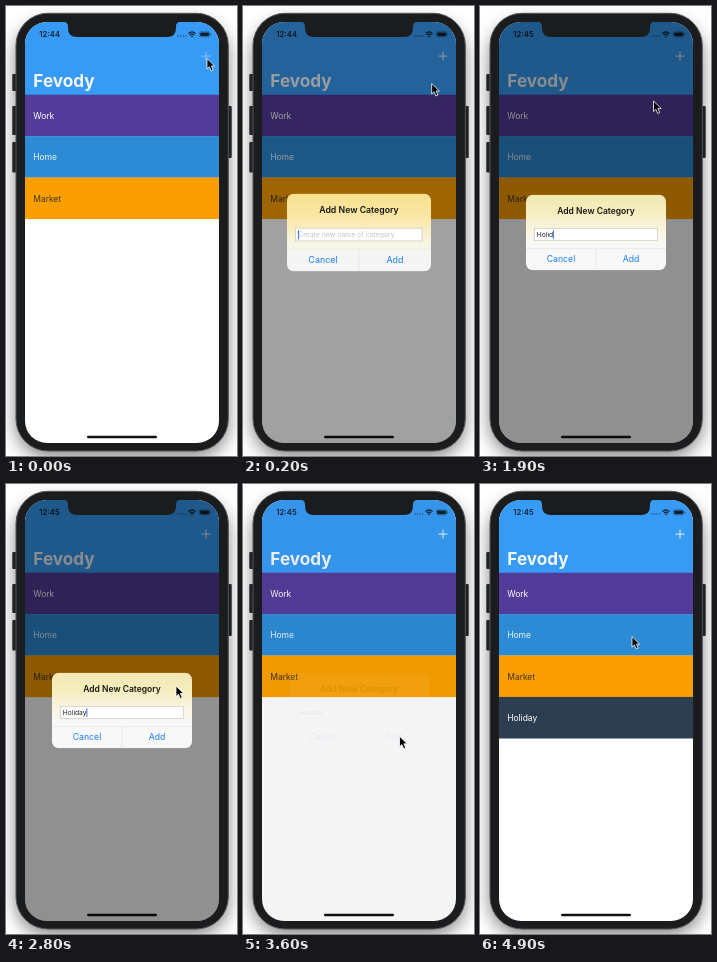
Animation, 231 px wide and 450 px high, one loop 5 s. Source, as an HTML page:

```html
<!DOCTYPE html>
<html lang="en">
<head>
<meta charset="utf-8">
<title>Add category</title>
<style>
  html, body { margin: 0; width: 100%; height: 100%; overflow: hidden; background: #fff; }
  svg { display: block; width: 231px; height: 450px; font-family: Inter, Roboto, sans-serif; }
  text { white-space: pre; }
  .row { font-size: 8.5px; letter-spacing: -.05px; }
  .bold { font-weight: 600; }
  .action { font-size: 8.7px; fill: #1980f5; text-anchor: middle; }
</style>
</head>
<body>
<svg viewBox="0 0 231 450">
  <defs>
    <clipPath id="screen"><rect x="19" y="16" width="194" height="421" rx="22"/></clipPath>
    <clipPath id="sheet"><rect x="46" y="188.7" width="140" height="75.6" rx="7"/></clipPath>
    <filter id="blur" x="-30%" y="-30%" width="160%" height="160%"><feGaussianBlur stdDeviation="9"/></filter>
    <linearGradient id="glass" x1="0" y1="0" x2="0" y2="1">
      <stop offset="0" stop-color="#f2e8b2"/>
      <stop offset=".24" stop-color="#f6edc0"/>
      <stop offset=".5" stop-color="#f9f6e6"/>
      <stop offset=".68" stop-color="#f8f8f8"/>
    </linearGradient>
    <linearGradient id="warm" x1="0" y1="0" x2="0" y2="1">
      <stop offset="0" stop-color="#f8e08e"/>
      <stop offset=".3" stop-color="#f9e7a6"/>
      <stop offset=".65" stop-color="#f8f5e6"/>
      <stop offset=".8" stop-color="#f5f5f5"/>
    </linearGradient>
  </defs>

  <rect x="10" y="17" width="212" height="434" rx="33" opacity=".5" filter="url(#blur)"/>
  <g fill="#202123">
    <rect x="6.3" y="68" width="5" height="17" rx="1"/>
    <rect x="6.3" y="100" width="5" height="29" rx="1"/>
    <rect x="6.3" y="136" width="5" height="30.5" rx="1"/>
    <rect x="221" y="100" width="4.7" height="52" rx="1"/>
  </g>
  <rect x="10" y="7.3" width="212.3" height="437.7" rx="32" fill="#1b1c1e" stroke="#55575a"/>

  <g clip-path="url(#screen)">
    <rect x="19" y="16" width="194" height="421" fill="#fff"/>
    <rect x="19" y="16" width="194" height="73" fill="#379bf5"/>
    <g id="rows"></g>
    <text x="27.3" y="80.6" font-size="17.2" font-weight="700" fill="#f4f7fa">Fevody</text>
    <path id="plus" d="M200 45.6v9M195.500 50.1h9" stroke="#fff" stroke-width="1"/>

    <g fill="#10202f">
      <text id="clock" class="bold" x="33.3" y="31" font-size="7.7"></text>
      <g opacity=".65">
        <circle cx="172" cy="30" r=".7"/><circle cx="174.600" cy="30" r=".7"/>
        <circle cx="177.200" cy="30" r=".7"/><circle cx="179.800" cy="30" r=".7"/>
      </g>
      <g fill="none" stroke="#10202f" stroke-width="1.2">
        <path d="M182.400 27.600q3.600-3.400 7.200 0M183.900 29.200q2.100-2 4.200 0"/>
      </g>
      <path d="M184.900 30.200q1.100-1 2.200 0l-1.100 1.300z"/>
      <rect x="193.400" y="25.600" width="10.400" height="5.400" rx="1.500" fill="none" stroke="#10202f" stroke-width=".5" opacity=".6"/>
      <rect x="194.200" y="26.400" width="8.800" height="3.800" rx=".9"/>
      <rect x="204.400" y="27.500" width=".8" height="1.700" rx=".4"/>
    </g>
    <rect x="81" y="429.800" width="70" height="2.500" rx="1.250" fill="#111"/>
    <rect id="shade" x="19" y="16" width="194" height="421"/>

    <g id="alert">
      <g clip-path="url(#sheet)">
        <rect x="46" y="188.700" width="140" height="75.600" fill="url(#glass)"/>
        <rect id="tint" x="46" y="188.700" width="140" height="75.600" fill="url(#warm)"/>
        <rect id="press" x="116" y="243" width="70" height="22" fill="#e4e4e4"/>
        <path d="M46 242.700h140M116 242.700v22" stroke="#dcdcdc" stroke-width=".5"/>
      </g>
      <text class="bold" x="116" y="207.500" font-size="8.500" text-anchor="middle" fill="#17170f">Add New Category</text>
      <rect x="54.300" y="222.300" width="123" height="12.400" fill="#fff" stroke="#c9c8c2" stroke-width=".7"/>
      <text id="hint" x="56.800" y="231" font-size="6.700" fill="#c4c4c8">Create new name of category</text>
      <text id="typed" x="56.800" y="231" font-size="6.700" fill="#222"></text>
      <rect id="caret" y="224.300" width="1" height="8.600" fill="#3d6df0"/>
      <text class="action" x="81" y="256.200">Cancel</text>
      <text class="action" x="151" y="256.200">Add</text>
    </g>
  </g>

  <path d="M57 15.500q5 .5 5 4.500v2q0 9 9 9h90q9 0 9-9v-2q0-4 5-4.500z" fill="#1b1c1e"/>
  <path id="pointer" d="M0 0v10.500l2.400-2.200 1.800 4.200 2-.9-1.800-4.100h3.300z" fill="#000" stroke="#fff" stroke-width=".8" stroke-linejoin="round"/>
</svg>

<script>
const LOOP = 5000, STEP = 100;
const $ = id => document.getElementById(id);

const ROWS = [
  ['Work', '#533c99', '#fff'],
  ['Home', '#2d8bd5', '#e9f3fb'],
  ['Market', '#fb9f00', '#40351f'],
  ['Holiday', '#2d3e51', '#fff']
];
$('rows').innerHTML = ROWS.map(([name, fill, ink], i) => {
  const y = 88.7 + i * 41.4;
  return `<g><rect x="19" y="${y}" width="194" height="41.6" fill="${fill}"/>` +
    `<text class="row" x="27.3" y="${y + 24}" fill="${ink}">${name}</text></g>`;
}).join('');
const newRow = $('rows').lastChild;

// Each key: time in ms, then values
const SHADE = [[0, 0], [100, .2], [200, .37], [300, .42], [400, .435], [3200, .435],
  [3300, .38], [3400, .28], [3500, .17], [3600, .04], [3700, 0]];
const FADE = [[0, 0], [100, .55], [200, 1], [3200, 1], [3300, .9], [3400, .74], [3500, .5], [3600, .07], [3700, 0]];
const SCALE = [[0, 1.2], [100, 1.11], [200, 1.028], [300, 1.006], [400, 1]];
const TINT = [[200, 1], [600, 0]];
const POINTER = [[0, 201, 52.5], [100, 198, 61], [200, 188.7, 77.5], [400, 179, 89], [600, 173.5, 95],
  [2500, 173.5, 95], [2600, 173, 115], [2800, 170, 202], [3000, 159, 245], [3100, 156.5, 252.3],
  [4300, 156.5, 252.3], [4400, 160, 244], [4600, 159, 200], [4800, 153, 159], [4900, 152, 152.6]];
const TYPED = [1200, 1400, 1600, 1700, 1900, 2100, 2400];

function at(keys, t) {
  const n = keys.findIndex(k => k[0] > t);
  if (n < 0) return keys[keys.length - 1].slice(1);
  if (n === 0) return keys[0].slice(1);
  const a = keys[n - 1], b = keys[n], p = (t - a[0]) / (b[0] - a[0]);
  return a.slice(1).map((v, i) => v + (b[i + 1] - v) * p);
}

const show = (el, on) => el.setAttribute('visibility', on ? 'inherit' : 'hidden');

function draw(t) {
  const count = TYPED.filter(k => k <= t).length;
  const [s] = at(SCALE, t), [x, y] = at(POINTER, t);

  $('clock').textContent = t < 1700 ? '12:44' : '12:45';
  $('plus').setAttribute('opacity', t < 100 ? .4 : .9);
  $('shade').setAttribute('opacity', at(SHADE, t)[0]);
  $('alert').setAttribute('opacity', at(FADE, t)[0]);
  $('alert').setAttribute('transform', `translate(116 226.5) scale(${s}) translate(-116 -226.5)`);
  $('tint').setAttribute('opacity', at(TINT, t)[0]);
  $('typed').textContent = 'Holiday'.slice(0, count);
  $('caret').setAttribute('x', 56.6 + (count ? $('typed').getComputedTextLength() : 0));
  $('pointer').setAttribute('transform', `translate(${x} ${y})`);
  show($('hint'), !count);
  show($('caret'), t < 3300);
  show($('press'), t >= 3200 && t < 3400);
  show(newRow, t >= 3800);
}

const start = performance.now();
function tick() {
  const t = (performance.now() - start) % LOOP;
  draw(Math.floor(t / STEP) * STEP);
  requestAnimationFrame(tick);
}
draw(0);
requestAnimationFrame(tick);
</script>
</body>
</html>
```
